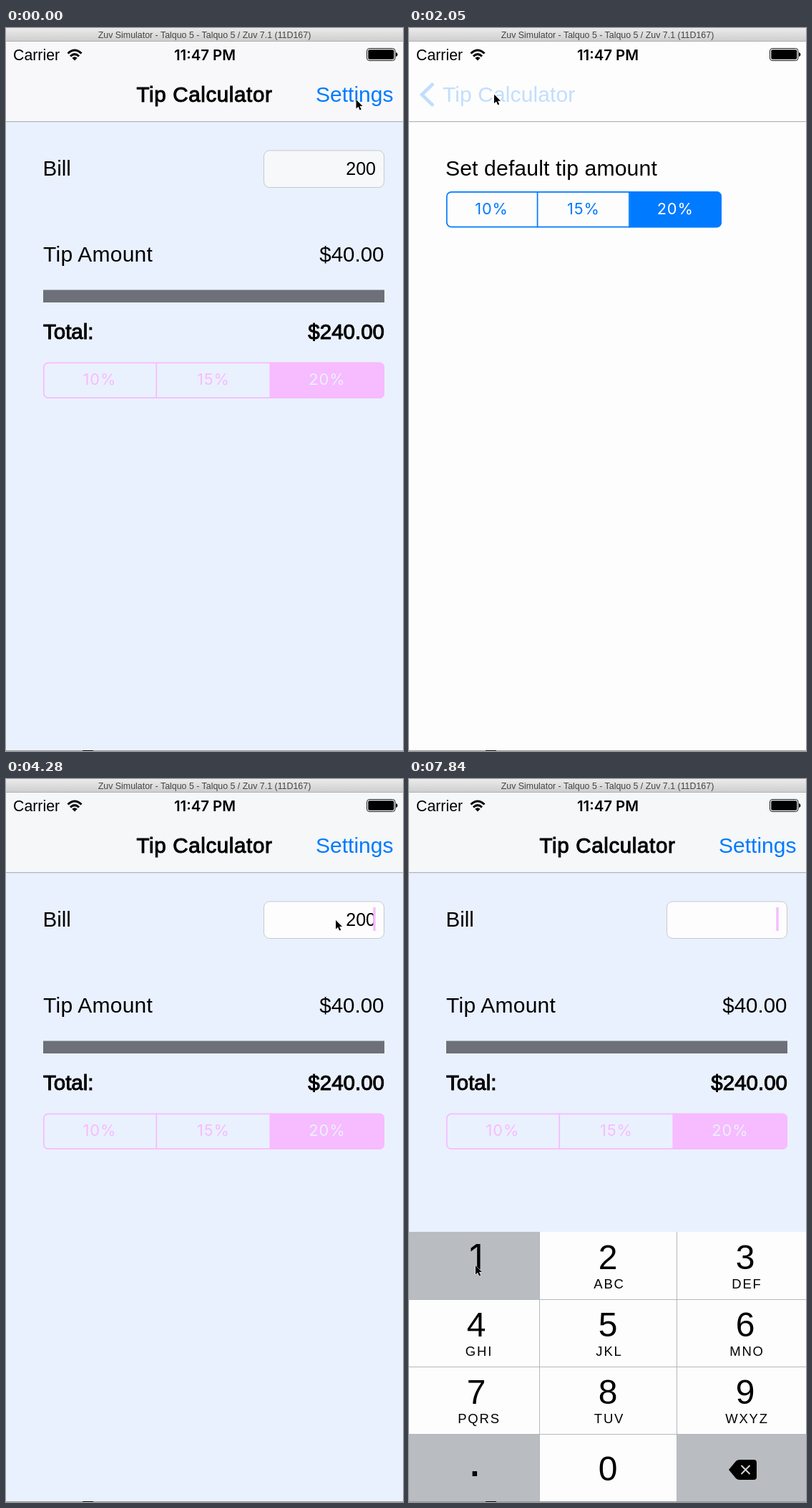
An HTML page for the animation above (7.99 s loop, 555 px wide and 1009 px high).

```html
<!DOCTYPE html>
<html lang="en">
<head>
<meta charset="utf-8">
<title>Tip Calculator</title>
<style>
  html, body { margin: 0; width: 100%; height: 100%; overflow: hidden; background: #fdfdfd; }
  svg { display: block; width: 100%; height: 100%; }
  text { font-family: "Liberation Sans", Arial, sans-serif; white-space: pre; }
  .plain { font-family: Inter, sans-serif; }
  .medium { stroke: #000; stroke-width: 1; }
</style>
</head>
<body>
<svg id="stage" viewBox="0 0 555 1009"></svg>
<script>
const LOOP = 7990;
const BLUE = '#007aff', PINK = '#f7bbff', SKY = '#eaf1fe', PAPER = '#fdfdfd', GRAY = '#b9bdc2', LINE = '#b4b7bb';
const PERCENTS = ['10%', '15%', '20%'];

const text = (s, x, y, size, extra = '') => `<text x="${x}" y="${y}" font-size="${size}" ${extra}>${s}</text>`;
const rect = (x, y, w, h, fill, extra = '') =>
  `<rect x="${x}" y="${y}" width="${w}" height="${h}" fill="${fill}" ${extra}/>`;
const PLAIN = 'class="plain"', MEDIUM = 'class="medium"', END = 'text-anchor="end"', MID = 'text-anchor="middle"';

// Segmented control; each segment holds a fill and a label.
function segments(id, x, y, w, h, color) {
  const part = w / 3;
  let out = `<clipPath id="${id}Clip">${rect(x, y, w, h, '#000', 'rx="7"')}</clipPath><g clip-path="url(#${id}Clip)">`;
  PERCENTS.forEach((label, i) => {
    out += rect(x + i * part, y, part, h, color, `id="${id}Fill${i}"`);
  });
  out += '</g>' + rect(x + .8, y + .8, w - 1.6, h - 1.6, 'none', `rx="6.5" stroke="${color}" stroke-width="1.7"`);
  PERCENTS.forEach((label, i) => {
    if (i) out += rect(x + i * part - 1.6, y, 1.7, h, color);
    out += text(label, x + (i + .5) * part - .6, y + 31.5, 21.8,
      `id="${id}Label${i}" letter-spacing=".9" ${PLAIN} ${MID}`);
  });
  return out;
}

function keypad() {
  const left = [0, 182, 374], width = [182, 192, 181];
  const digitX = [94, 278, 470], lettersX = [98, 280, 472.5];
  const letters = ['', 'ABC', 'DEF', 'GHI', 'JKL', 'MNO', 'PQRS', 'TUV', 'WXYZ'];
  let out = '';
  for (let i = 0; i < 12; i++) {
    const col = i % 3, top = 632 + 94 * Math.floor(i / 3);
    out += rect(left[col], top, width[col], 95, i === 9 ? GRAY : PAPER, `id="key${i + 1}"`);
    if (i < 9) {
      out += text(i + 1, digitX[col], top + 52, 48, `${i ? '' : PLAIN} ${MID}`);
      out += text(letters[i], lettersX[col], top + 79, 18.5, `letter-spacing="1.8" ${MID}`);
    }
  }
  for (const y of [726, 820, 914]) out += rect(0, y, 555, 1, LINE);
  for (const x of [182, 374]) out += rect(x, 632, 1, 377, LINE);
  return out + text('.', 92, 973, 46, `font-weight="700" ${MID}`) + text('0', 278, 979, 48, MID) +
    '<path d="M447 964L457 952Q459 950 462 950H482Q486 950 486 954V974Q486 978 482 978H462Q459 978 457 976Z"/>' +
    '<path id="cross" d="M464.5 958l12 12m0-12l-12 12" stroke-width="2"/>';
}

const home = rect(0, 75, 555, 934, SKY) +
  text('Bill', 51.5, 206, 29.5) +
  rect(360.5, 171, 168, 51.5, PAPER, 'id="field" rx="8" stroke="#c6c8cd"') +
  text('200', 517, 205, 25, `id="bill" ${END}`) +
  rect(513.3, 179, 3.4, 33, PINK, 'id="caret"') +
  text('Tip Amount', 52, 326, 30, 'letter-spacing=".25"') +
  text('$40.00', 528.5, 326, 29.5, END) +
  rect(52, 365.5, 477, 17.5, '#6d7078') +
  text('Total:', 52, 434, 29.5, MEDIUM) +
  text('$240.00', 529, 434, 29.5, `${MEDIUM} ${END}`) +
  segments('tip', 52, 466.5, 477, 50.5, PINK) +
  rect(0, 75, 555, 934, '#000', 'id="dim"');

const settings = rect(0, 75, 555, 934, PAPER) +
  text('Set default tip amount', 51, 206, 30.2, 'letter-spacing=".1"') +
  segments('def', 52, 228, 385, 50.5, BLUE);

const nav = rect(0, 19, 555, 111, '#f8f8fa', 'id="navBase"') +
  rect(0, 19, 555, 111, PAPER, 'id="navWhite"') +
  rect(0, 130, 555, 1.2, '#b1b3b7') +
  text('Tip Calculator', 182.5, 103, 29.5, `id="title" letter-spacing=".65" ${MEDIUM}`) +
  text('Settings', 541.5, 103, 30, `id="settingsBtn" fill="${BLUE}" ${END}`) +
  `<g id="back" fill="${BLUE}"><path d="M34 77.5L18 93L34 108.5" fill="none" stroke="${BLUE}" stroke-width="4.6"/>` +
  text('Tip Calculator', 0, 103, 30, 'id="backLabel" letter-spacing=".1"') + '</g>';

const status = text('Carrier', 10, 45, 21.3) +
  text('11:47 PM', 278, 45, 20.4, `font-weight="600" ${PLAIN} ${MID}`) +
  '<g fill="none" stroke="#000" stroke-width="3"><path d="M86.5 35.5Q96 26.5 105.5 35.5"/><path d="M90 39.5Q96 33.8 102 39.5"/></g>' +
  '<path d="M96 45.5L92.3 41.8Q96 38.6 99.7 41.8Z"/>' +
  rect(504.5, 28.5, 39.5, 17, 'none', 'rx="3.5" stroke="#222"') +
  rect(506.3, 30.2, 36, 13.6, '#000', 'rx="2"') +
  '<path d="M545 34Q547.5 34.5 547.5 37T545 40Z"/>';

const frame = '<linearGradient id="bar" x2="0" y2="1"><stop stop-color="#ebebeb"/><stop offset="1" stop-color="#cdcdcd"/></linearGradient>' +
  rect(0, 0, 555, 19, 'url(#bar)') + rect(0, 18, 555, 1, '#b0b0b0') +
  text('Zuv Simulator - Talquo 5 - Talquo 5 / Zuv 7.1 (11D167)', 277.5, 14, 12.4, `fill="#444" ${MID}`) +
  rect(0, 1008, 555, 1, '#96989c') + rect(107, 1008, 15, 1, '#000');

document.getElementById('stage').innerHTML =
  `<g id="home">${home}</g><g id="settings">${settings}</g>${nav}${status}<g id="pad">${keypad()}</g>${frame}` +
  '<path id="cursor" d="M0 0V12.5L3 9.8L5.1 14.6L7.2 13.7L5.1 9H9Z" stroke="#fff" stroke-width="1" paint-order="stroke"/>';

const el = {};
document.querySelectorAll('[id]').forEach(node => el[node.id] = node);
const set = (id, name, value) => el[id].setAttribute(name, value);
const move = (id, x, y) => set(id, 'transform', `translate(${x} ${y})`);
const clamp = v => Math.max(0, Math.min(1, v));
const spring = x => x <= 0 ? 0 : 1 - (1 + x) * Math.exp(-x);

// Pointer stops: beat, x, y.
const PATH = [
  [0, 489.5, 100], [3, 490, 97], [7, 385, 250], [9, 372, 252], [13, 119, 93], [16, 119, 92],
  [19, 408, 322], [20, 408, 322], [25, 461, 191], [27, 461, 197], [38, 461, 197],
  [43, 468.5, 980], [48, 468.5, 980], [53, 93, 679], [54, 93, 679]
];

function pointer(beat) {
  const i = Math.max(1, PATH.findIndex(p => p[0] >= beat));
  const [b0, x0, y0] = PATH[i - 1], [b1, x1, y1] = PATH[i];
  const u = clamp((beat - b0) / (b1 - b0)), e = u * u * (3 - 2 * u);
  return [x0 + (x1 - x0) * e, y0 + (y1 - y0) * e];
}

// The screen refreshes in beats, slightly slower in the second part.
const beatAt = t => Math.floor(t < 2640 ? (t + 3) / 146.3 : 19 + (t - 2787) / 148.5);

function select(id, chosen, color, active) {
  PERCENTS.forEach((label, i) => {
    set(id + 'Fill' + i, 'opacity', i === chosen ? 1 : 0);
    set(id + 'Label' + i, 'fill', i === chosen ? active : color);
  });
}

function caretOpacity(beat) {
  if (beat < 29 || beat === 33 || beat === 34 || beat === 40 || beat === 41) return 0;
  return beat === 32 || beat === 39 ? .5 : 1;
}

function draw(t) {
  const beat = Math.min(53, beatAt(t));
  const pushing = beat < 14;
  const shown = pushing ? spring(2.37 * (beat - 1)) : 1 - spring(2.68 * (beat - 14));

  move('home', -166.5 * shown, 0);
  move('settings', 555 * (1 - shown), 0);
  set('dim', 'opacity', .1 * shown);

  const titleAlpha = pushing ? clamp(1 - .48 * (beat - 1)) : clamp((beat - 15) / 2);
  const backAlpha = pushing ? clamp((beat - 2) / 2.8) : beat === 14 ? .23 : beat === 15 ? .1 : 0;
  set('navBase', 'fill', pushing ? '#f8f8fa' : '#f5f7f8');
  set('navWhite', 'opacity', shown);
  set('title', 'opacity', titleAlpha);
  move('title', -100 * shown, 0);
  set('settingsBtn', 'opacity', beat === 1 ? .25 : titleAlpha);
  set('back', 'opacity', backAlpha);
  set('backLabel', 'x', 47 + 100 * (1 - shown));

  select('tip', 2, PINK, SKY);
  select('def', beat < 8 ? 0 : 2, BLUE, '#fff');

  set('field', 'fill', pushing ? '#f7f8fa' : PAPER);
  el.bill.textContent = '200'.slice(0, beat < 44 ? 3 : beat < 46 ? 2 : beat < 48 ? 1 : 0);
  set('caret', 'opacity', caretOpacity(beat));

  move('pad', 0, 378 * (1 - clamp(.55 * (beat - 34))));
  const erase = beat === 44 || beat === 46 || beat === 48 ? PAPER : GRAY;
  set('key1', 'fill', beat === 53 ? GRAY : PAPER);
  set('key12', 'fill', erase);
  set('cross', 'stroke', erase === GRAY ? '#d5d8dc' : '#fff');

  move('cursor', ...pointer(beat));
}

const start = performance.now();
function tick() {
  draw((performance.now() - start) % LOOP);
  requestAnimationFrame(tick);
}
tick();
</script>
</body>
</html>
```
